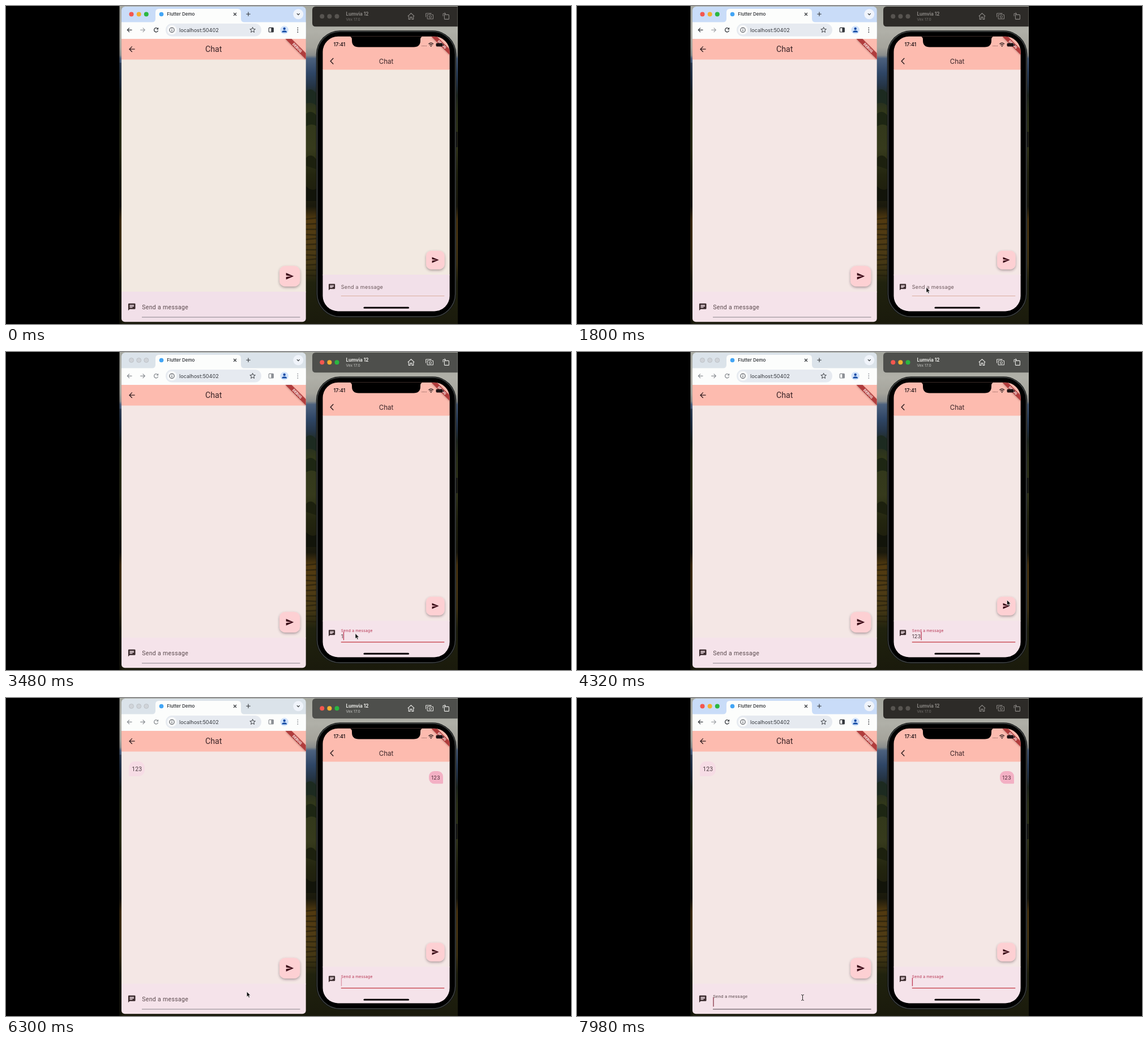
An HTML page for the animation above (8000 ms loop, 998x561 px).

```html
<!DOCTYPE html>
<html lang="en">
<head>
<meta charset="utf-8">
<title>Chat demo</title>
<style>
  html, body { margin: 0; width: 100%; height: 100%; overflow: hidden; background: #000; }
  svg { display: block; width: 100%; height: 100%; }
  .ui { font-family: Inter, "Open Sans", sans-serif; }
  .app { font-family: Roboto, "Noto Sans", sans-serif; }
</style>
</head>
<body>
<svg id="stage" viewBox="0 0 998 561" xmlns="http://www.w3.org/2000/svg"></svg>
<script>
const LOOP = 8000;
const INK = '#3a2a2d';
const stage = document.getElementById('stage');

// Markup helpers
const rect = (x, y, w, h, fill, r = 0, extra = '') =>
  `<rect x="${x}" y="${y}" width="${w}" height="${h}" rx="${r}" fill="${fill}" ${extra}/>`;
const dot = (x, y, r, fill, extra = '') =>
  `<circle cx="${x}" cy="${y}" r="${r}" fill="${fill}" ${extra}/>`;
const path = (d, fill, extra = '') => `<path d="${d}" fill="${fill}" ${extra}/>`;
const line = (d, color, w = 1.2, extra = '') =>
  `<path d="${d}" fill="none" stroke="${color}" stroke-width="${w}" ${extra}/>`;
const text = (x, y, size, fill, str, cls = 'ui', extra = '') =>
  `<text x="${x}" y="${y}" font-size="${size}" fill="${fill}" class="${cls}" ${extra}>${str}</text>`;
const group = (id, body, extra = '') => `<g id="${id}" ${extra}>${body}</g>`;
const icon = (d, cx, cy, k, fill = INK) =>
  path(d, fill, `transform="translate(${cx} ${cy}) scale(${k}) translate(-12 -12)"`);

const SEND = 'M2 21L23 12 2 3V10L17 12 2 14Z';
const BACK = 'M20 11H7.8L13.4 5.4 12 4 4 12 12 20 13.4 18.6 7.8 13H20Z';
const NOTE = 'M20 2H4Q2 2 2 4V22L6 18H20Q22 18 22 16V4Q22 2 20 2ZM6 9H18V11H6ZM14 14H6V12H14ZM18 8H6V6H18Z';

function desktop() {
  const stops = [[0, '#a5a79f'], [8, '#b0b0a8'], [13, '#a5a49c'], [15.5, '#8a8d8c'], [16.5, '#4c617e'],
    [21, '#2f4666'], [25, '#253547'], [28, '#212b22'], [33, '#30371a'], [45, '#363a1c'],
    [53, '#23250f'], [63, '#1a190c'], [67, '#51390f'], [74, '#4f3b14'], [81, '#443714'],
    [87, '#20220e'], [100, '#1a1a0c']];
  const grad = stops.map(([o, c]) => `<stop offset="${o}%" stop-color="${c}"/>`).join('');
  let rows = '';
  for (let y = 376; y < 482; y += 9)
    rows += line(`M529 ${y}l20 ${y % 4 - 2}`, '#211d0b', 2.5, 'opacity=".6"');
  return `<linearGradient id="land" x2="0" y2="1">${grad}</linearGradient>` +
    rect(200.5, 0, 597.5, 561, 'url(#land)') +
    path('M530 150Q540 142 549 156V176Q540 168 530 172Z', '#1c2a20') +
    path('M530 190Q540 182 549 194V212Q540 206 530 212Z', '#1d2613') +
    path('M530 268Q540 258 549 272V288L530 282Z', '#1c200e') +
    path('M530 318Q540 328 549 322V344H530Z', '#12140a') + rows +
    rect(200.5, 100, 3.5, 461, '#000', 0, 'opacity=".3"');
}

function lights(xs, y, colors, stroke = '') {
  return xs.map((x, i) => dot(x, y, 4, colors[i], stroke)).join('');
}
const RGY = ['#f4574f', '#f5b02f', '#2bb741'];

function banner(x, y, k) {
  const a = 56.6 * k, b = 39.6 * k, m = 24 * k;
  return path(`M${x - a} ${y}H${x - b}L${x} ${y + b}V${y + a}Z`, '#b03c3d', 'filter="url(#soft)"') +
    text(0, 3.7 * k, 10.2 * k, '#fbe9e7', 'DEBUG', 'app',
      `font-weight="900" text-anchor="middle" transform="translate(${x - m} ${y + m}) rotate(45)"`);
}

function fab(x, y, s, k) {
  return rect(x, y, s, s, '#fdd0d3', s * .28, 'filter="url(#lift)"') +
    icon(SEND, x + s / 2, y + s / 2, k, '#3b0a16');
}

// Round box with one bottom corner nearly square
function bubble(x, y, w, h, r, tailRight, fill) {
  const [bl, br] = tailRight ? [r, 1.5] : [1.5, r];
  return path(`M${x + r} ${y}h${w - 2 * r}a${r} ${r} 0 0 1 ${r} ${r}v${h - r - br}a${br} ${br} 0 0 1 ${-br} ${br}` +
    `h${br + bl - w}a${bl} ${bl} 0 0 1 ${-bl} ${-bl}v${r + bl - h}a${r} ${r} 0 0 1 ${r} ${-r}Z`, fill);
}

function chrome() {
  const tools = (c, fwd) =>
    line('M222.5 42.3H214.5M218 38.6L214.3 42.3L218 46', c) +
    line('M237.2 42.3H245.2M241.6 38.6L245.3 42.3L241.6 46', fwd) +
    line('M268 40A3.6 3.6 0 1 0 268.6 43.4', c, 1.3) + path('M269.2 37.8V41.4H265.6Z', c) +
    rect(464.3, 38.4, 8, 7.6, 'none', 1, `stroke="${c}" stroke-width="1.2"`) + rect(468.4, 38.4, 4, 7.6, c) +
    [38.6, 42.3, 46].map(y => dot(515.3, y, .95, c)).join('');
  let star = '';
  for (let i = 0; i < 10; i++) {
    const r = i % 2 ? 2.2 : 5, a = i * Math.PI / 5;
    star += `${i ? 'L' : 'M'}${435.6 + r * Math.sin(a)} ${42.4 - r * Math.cos(a)}`;
  }
  return rect(204, 1, 326, 58, '#dbe3ea', 6, 'id="strip"') +
    group('webOn', lights([221.5, 234.7, 247.8], 14.5, RGY)) +
    group('webOff', lights([221.5, 234.7, 247.8], 14.5, Array(3).fill('#d0d4d9'), 'stroke="#b4b8be" stroke-width=".7"')) +
    path('M258 28.5Q264 28.5 264 22.5V11Q264 5 270 5H409Q415 5 415 11V22.5Q415 28.5 421 28.5H530V58H204V28.5Z', '#fcfdfc') +
    dot(274.5, 14.5, 3.8, '#42a5f5') +
    text(284.2, 17.3, 8, '#24272c', 'Flutter Demo', 'ui', 'font-weight="500"') +
    line('M402 12L407 17M407 12L402 17', '#33363a', 1.1) +
    line('M424.3 14.3H431.7M428 10.6V18', '#33363a', 1.1) +
    dot(516.3, 14.3, 9, '#f0f4fb') + line('M513.9 13.2L516.3 15.6L518.7 13.2', '#33363a', 1.2) +
    rect(282, 31, 169, 22.5, '#e6eaf0', 11.2) +
    dot(293, 42.3, 8.5, '#f8f9fa') + dot(293, 42.3, 4.1, 'none', 'stroke="#3a3d42"') +
    line('M293 41.6V44.6M293 39.7V40.7', '#3a3d42', 1) +
    text(306, 45.5, 9.1, '#34373d', 'localhost:50402') +
    line(star + 'Z', '#3a3d42', 1) +
    dot(491.7, 42.3, 7.2, '#d2e3fb') + dot(491.7, 40, 2.2, '#174ea6') +
    path('M487.3 46.4Q487.3 43.2 491.7 43.2T496.1 46.4Z', '#174ea6') +
    group('toolsOn', tools('#34373c', '#a0a3a7')) + group('toolsOff', tools('#8b8f94', '#8b8f94'));
}

function browser() {
  return `<g clip-path="url(#webClip)">` + chrome() +
    rect(204, 94, 326, 411, '#f4e7e3', 0, 'class="page"') +
    rect(204, 504, 326, 54, '#f4e1e9', 0, 'class="foot"') +
    rect(204, 58, 326, 36.5, '#fdbbaf') + banner(530, 58, .645) +
    icon(BACK, 222.3, 76.2, .66, '#332023') +
    text(366.7, 80.8, 14.2, '#3a2427', 'Chat', 'app', 'text-anchor="middle"') +
    group('webMsg', bubble(217, 112, 28, 26, 11, false, '#f6dce5') +
      text(222.2, 128.8, 10.4, '#4d3c42', '123', 'app', 'letter-spacing=".25"')) +
    fab(483, 458.5, 36.3, .645) + icon(NOTE, 222.2, 531, .63) +
    group('webLabel', text(0, 0, 10.5, '#5b4a4e', 'Send a message', 'app', 'letter-spacing=".33"')) +
    rect(240, 548.4, 279.5, 1.2, '#9c949c', 0, 'id="webLine"') +
    rect(240.3, 528, 1.4, 16.5, '#8f4052', 0, 'id="webCaret"') + '</g>';
}

function toolbar() {
  const tools = line('M709.7 18.2L715.5 12.8L721.3 18.2M711.3 17.5V23.4H714V19.6H717V23.4H719.7V17.5', 'currentColor', 1.1) +
    line('M741.6 19.5V13H751.5M744.2 15.4H746.6L747.6 14.4H751L752 15.4H754.5V22.8H744.2Z', 'currentColor', 1) +
    dot(749.4, 19, 2, 'none', 'stroke="currentColor"') +
    rect(774.4, 15.4, 8, 8, 'none', 1, 'stroke="currentColor" stroke-width="1.1"') +
    line('M772 18V13.4H776M774.5 11.5L776.6 13.4L774.5 15.3', 'currentColor', 1);
  return path('M797.7 1V36.3H547Q541 36.3 541 30.3V7Q541 1 547 1Z', '#2d2b28', 'id="bar"') +
    group('simOn', lights([558.3, 571.4, 584.5], 18.3, RGY)) +
    group('simOff', lights([558.3, 571.4, 584.5], 18.3, Array(3).fill('#575450'))) +
    group('simText', text(600.4, 17.3, 8.3, 'currentColor', 'Lumvia 12', 'ui', 'font-weight="700"') +
      text(600.5, 26, 6.7, 'currentColor', 'Vex 17.0', 'ui', 'opacity=".75"') + tools);
}

function phone() {
  const wifi = line('M746.5 67Q750.7 63.4 754.9 67M748.2 69Q750.7 66.8 753.2 69', '#1c1214', 1.3) + dot(750.7, 70.7, 1, '#1c1214');
  return rect(795, 222, 2.4, 27, '#151515') +
    rect(547.8, 43.2, 247.6, 506.6, '#141515', 42) +
    rect(549.6, 45, 244, 503, '#000', 40.5, 'stroke="#414544" stroke-width="1.4"') +
    `<g clip-path="url(#simClip)">` +
    rect(559, 112, 226, 363, '#f4e7e3', 0, 'class="page"') +
    rect(559, 474, 226, 66, '#f4e1e9', 0, 'class="foot"') +
    rect(559, 53, 226, 59.4, '#fdbbaf') +
    wifi + [735, 737.4, 739.8, 742.2].map(x => dot(x, 70.4, .6, '#6e4a48')).join('') +
    banner(784, 54, .574) + rect(759.5, 65.6, 12, 6, '#1c1214', 1.8) + rect(772, 67.4, 1.2, 2.5, '#1c1214') +
    path('M606 53.5Q611 54 611 59V60.8Q611 72.6 623 72.6H720Q732 72.6 732 60.8V59Q732 54 737 53.5Z', '#000') +
    text(578.6, 71.4, 8.9, '#251719', '17:41', 'ui', 'font-weight="600"') +
    line('M578.3 92L573.2 97.2L578.3 102.4', '#2a1a1c', 1.4) +
    text(671.5, 101.5, 11.6, '#3a2427', 'Chat', 'ui', 'text-anchor="middle"') +
    group('simMsg', bubble(747, 129, 25, 22.3, 9.5, true, '#f3b0c4') +
      text(751.2, 143.6, 9.2, '#54303d', '123', 'ui', 'letter-spacing=".28"')) +
    fab(742, 431.8, 32.6, .574) + icon(NOTE, 575.6, 495.8, .56) +
    group('simLabel', text(0, 0, 9, 'currentColor', 'Send a message', 'ui', 'letter-spacing=".28"')) +
    text(591.8, 505.2, 9.1, '#49353a', '', 'ui', 'id="typed" letter-spacing=".28"') +
    rect(591.8, 511, 182.5, 1, '#dcae9f', 0, 'id="simLine"') +
    rect(0, 493.8, 1.3, 14.5, '#bd3a55', 0, 'id="simCaret"') +
    rect(631.5, 530.7, 80.5, 3, '#0d080a', 1.5) + '</g>';
}

stage.innerHTML = `<defs>
  <clipPath id="webClip"><rect x="204" y="1" width="325.7" height="556.2" rx="6"/></clipPath>
  <clipPath id="simClip"><rect x="559.5" y="53.8" width="224.1" height="484.6" rx="27"/></clipPath>
  <filter id="soft" x="-30%" y="-30%" width="160%" height="160%"><feDropShadow dx="0" dy="1" stdDeviation="1.5" flood-opacity=".3"/></filter>
  <filter id="lift" x="-40%" y="-40%" width="180%" height="180%"><feDropShadow dx="0" dy="2" stdDeviation="2" flood-color="#43262c" flood-opacity=".42"/></filter>
  </defs>` + rect(0, 0, 998, 561, '#000') + desktop() + browser() + toolbar() + phone() +
  group('arrow', path('M0 0V9.2L2.1 7.3L3.6 10.7L5.2 10L3.7 6.7H6.6Z', '#0c0c0c', 'stroke="#fff" stroke-width=".6"')) +
  group('beam', line('M-2.3 -5Q0 -5 0 -3.5Q0 -5 2.3 -5M0 -4V4M-2.3 5Q0 5 0 3.5Q0 5 2.3 5', '#2a2a2a', 1));

const el = Object.fromEntries([...stage.querySelectorAll('[id]')].map(n => [n.id, n]));
const set = (node, name, value) => node.setAttribute(name, value);
const show = (id, on) => set(el[id], 'visibility', on ? 'visible' : 'hidden');
const clamp = v => Math.max(0, Math.min(1, v));
const ease = v => { v = clamp(v); return v * v * (3 - 2 * v); };
const mix = (a, b, v) => a + (b - a) * v;

// Event times in ms
const FOCUS = 2050, SENT = 4720, WEB_MSG = 4860, WEB_ACTIVE = 6760, WEB_FOCUS = 7700, BEAM = 7560;
const KEYS = [3150, 3520, 3900];
const MOVES = [[860, 556, 561], [1240, 595, 461], [1720, 617, 496.5], [3950, 617, 496.5],
  [4300, 759.5, 437.5], [5080, 759.5, 437.5], [6300, 425.3, 518], [6700, 398.5, 528.5], [LOOP, 398.5, 528.5]];

function pointerAt(t) {
  const i = Math.max(1, MOVES.findIndex(m => m[0] > t));
  const [t0, x0, y0] = MOVES[i - 1], [t1, x1, y1] = MOVES[i];
  const v = ease((t - t0) / (t1 - t0));
  return [mix(x0, x1, v), mix(y0, y1, v)];
}

// Half a second on, half off, with short fades
function blink(age) {
  const p = age % 1000;
  return p < 500 ? (age < 500 ? 1 : clamp(p / 100)) : clamp(1 - (p - 500) / 150);
}

function floatLabel(node, x, y0, y1, v) {
  set(node, 'transform', `translate(${x} ${mix(y0, y1, v)}) scale(${mix(1, .75, v)})`);
}

function render(t) {
  const sim = t >= FOCUS && t < WEB_ACTIVE;
  for (const id of ['webOn', 'toolsOn', 'simOff']) show(id, !sim);
  for (const id of ['webOff', 'toolsOff', 'simOn']) show(id, sim);
  set(el.strip, 'fill', sim ? '#dbe3ea' : '#c9dcf8');
  set(el.bar, 'fill', sim ? '#4e4f4c' : '#2d2b28');
  set(el.simText, 'color', sim ? '#e8e8e5' : '#8a8784');
  const warm = t < 1660;
  for (const n of stage.querySelectorAll('.page')) set(n, 'fill', warm ? '#f2e9e1' : '#f4e7e5');
  for (const n of stage.querySelectorAll('.foot')) set(n, 'fill', warm ? '#f2e0e9' : '#f5e3ea');

  const focused = t >= FOCUS;
  floatLabel(el.simLabel, 591.8, 499.3, 494.4, ease((t - FOCUS) / 167));
  set(el.simLabel, 'color', focused ? '#b5304e' : '#69565a');
  set(el.simLine, 'fill', focused ? '#ca525c' : '#dcae9f');
  set(el.simLine, 'height', focused ? 1.5 : 1);
  const count = t < SENT ? KEYS.filter(k => t >= k).length : 0;
  el.typed.textContent = '123'.slice(0, count);
  set(el.simCaret, 'x', 591.8 + (count ? el.typed.getComputedTextLength() : 0));
  const last = [FOCUS, ...KEYS, SENT].filter(k => t >= k).pop();
  set(el.simCaret, 'opacity', focused ? blink(t - last) : 0);
  show('simMsg', t >= SENT);
  show('webMsg', t >= WEB_MSG);

  const typing = t >= WEB_FOCUS;
  floatLabel(el.webLabel, 240.2, 534.5, 529.2, ease((t - WEB_FOCUS) / 167));
  set(el.webLine, 'fill', typing ? '#655a64' : '#9c949c');
  show('webCaret', typing);

  const [x, y] = pointerAt(t);
  for (const id of ['arrow', 'beam']) set(el[id], 'transform', `translate(${x} ${y})`);
  show('arrow', t >= MOVES[0][0] && t < BEAM);
  show('beam', t >= BEAM);
}

const start = performance.now();
function tick() {
  render((performance.now() - start) % LOOP);
  requestAnimationFrame(tick);
}
render(0);
requestAnimationFrame(tick);
</script>
</body>
</html>
```
